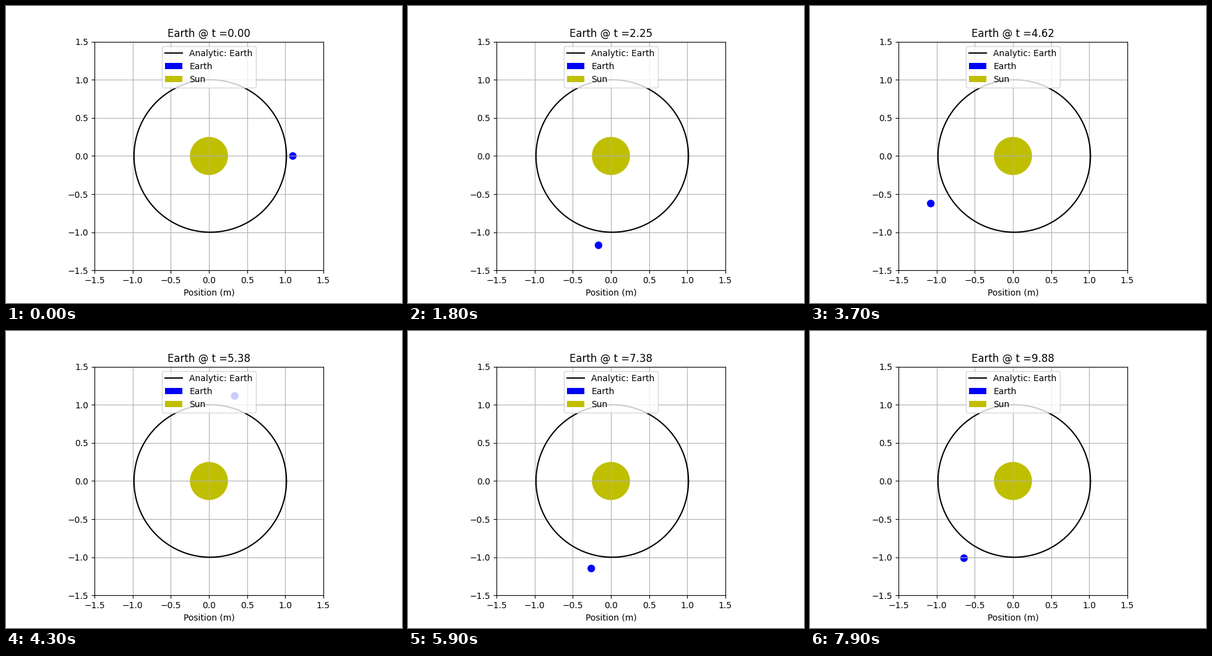
These frames come from a looping animation (640 px wide and 480 px high, 8000 ms). A matplotlib script:

```python
import numpy as np
import matplotlib.pyplot as plt
from matplotlib.animation import FuncAnimation
from matplotlib.patches import Circle

FRAMES = 80
INTERVAL = 100
DT = 0.125

# Slowly precessing ellipse with the sun at its focus
PERIHELION = 1.1
ECC = 0.07
PERIOD = 1.2774
PRECESSION = np.radians(-1.775)


def orbit(t):
    mean = 2 * np.pi * t / PERIOD
    ecc_anom = mean
    for _ in range(20):
        ecc_anom = mean + ECC * np.sin(ecc_anom)
    a = PERIHELION / (1 - ECC)
    x = a * (np.cos(ecc_anom) - ECC)
    y = a * np.sqrt(1 - ECC**2) * np.sin(ecc_anom)
    c, s = np.cos(PRECESSION * t), np.sin(PRECESSION * t)
    return c * x - s * y, s * x + c * y


fig, ax = plt.subplots(figsize=(6.4, 4.8), dpi=100)
ax.set_aspect("equal")
ax.set_xlim(-1.5, 1.5)
ax.set_ylim(-1.5, 1.5)
ticks = np.arange(-1.5, 1.6, 0.5)
ax.set_xticks(ticks)
ax.set_yticks(ticks)
ax.set_xlabel("Position (m)")
ax.grid(True)

phi = np.linspace(0, 2 * np.pi, 400)
ax.plot(0.0167 + np.cos(phi), np.sin(phi), "k", label="Analytic: Earth")
earth = ax.add_patch(Circle(orbit(0), 0.05, fc="b", label="Earth"))
ax.add_patch(Circle((0, 0), 0.25, fc="y", label="Sun"))
ax.legend(loc="upper center")
title = ax.set_title("Earth @ t =0.00")


def update(i):
    t = i * DT
    earth.center = orbit(t)
    title.set_text(f"Earth @ t ={t:.2f}")
    return earth, title


anim = FuncAnimation(fig, update, frames=FRAMES, interval=INTERVAL,
                     repeat=True, repeat_delay=0, blit=False)
plt.show()
```
